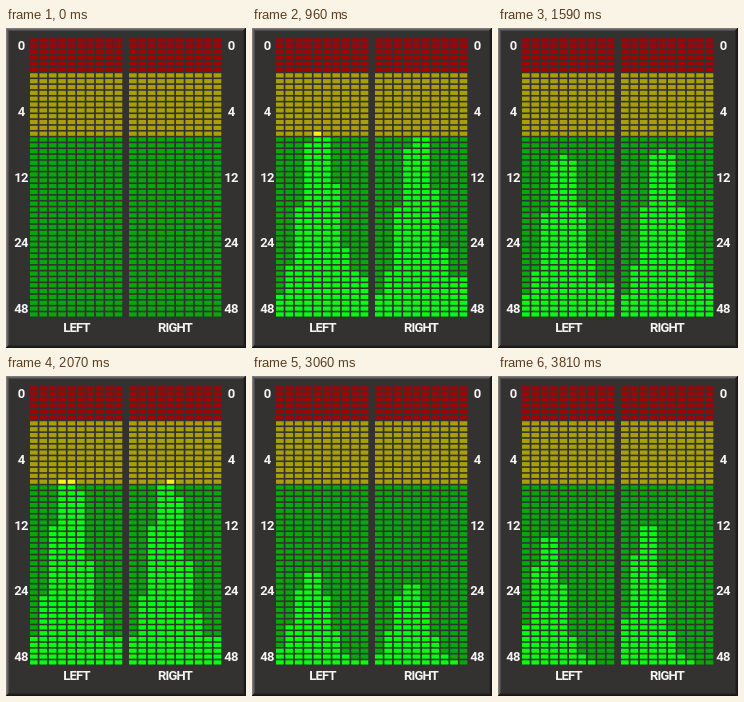
Write an HTML page with a canvas that moves like this. It is 240 by 320 pixels and loops after 3.84 s.

```html
<!DOCTYPE html>
<html lang="en">
<head>
<meta charset="utf-8">
<title>Stereo level meter</title>
<style>
  html, body { margin: 0; width: 100%; height: 100%; overflow: hidden; background: #333231; }
  canvas { display: block; width: 240px; height: 320px; }
</style>
</head>
<body>
<canvas id="meter" width="240" height="320"></canvas>
<script>
const ctx = document.getElementById('meter').getContext('2d');
const LOOP = 3840, STEP = 30;
const ROWS = 48, COLS = 10, TOP = 10.3, ROW_PITCH = 5.83, COL_PITCH = 9.4;
const CELL_WIDTH = 7.7, CELL_HEIGHT = 4.2;
const CHANNELS = [24, 123];

// The spectrum is a bell that grows, drifts and narrows between these moods.
const MOODS = [
  { time: 30, peaks: [0, 0], center: 4.2, width: 2.4, treble: 0 },
  { time: 450, peaks: [34, 34], center: 4.2, width: 2.4, treble: 7 },
  { time: 960, peaks: [32, 31], center: 4.1, width: 2.35, treble: 5 },
  { time: 1590, peaks: [28, 29], center: 4, width: 2.35, treble: 4 },
  { time: 2520, peaks: [36, 34], center: 3.5, width: 2.45, treble: 2 },
  { time: 3060, peaks: [16, 14], center: 3.4, width: 2.2, treble: 0 },
  { time: 3810, peaks: [22, 24], center: 2.35, width: 1.9, treble: 0 }
];

const ZONES = [
  { end: 6, dim: '#a00404', lit: '#ff1010' },
  { end: 17, dim: '#a8a006', lit: '#fff01c' },
  { end: ROWS, dim: '#06a80c', lit: '#06ff10' }
];

const mix = (a, b, p) => a + (b - a) * p;

function drawPanel() {
  ctx.fillStyle = '#333231';
  ctx.fillRect(0, 0, 240, 320);
  for (let i = 0; i < 3; i++) {
    const light = 124 - 24 * i, shade = 22 + 9 * i;
    ctx.fillStyle = `rgb(${shade}, ${shade}, ${shade})`;
    ctx.fillRect(239 - i, i, 1, 320 - 2 * i);
    ctx.fillRect(i, 319 - i, 240 - 2 * i, 1);
    ctx.fillStyle = `rgb(${light}, ${light}, ${light})`;
    ctx.fillRect(i, i, 239 - 2 * i, 1);
    ctx.fillRect(i, i, 1, 319 - 2 * i);
  }
}

function drawLabels() {
  ctx.font = 'bold 13px Roboto, sans-serif';
  ctx.letterSpacing = '-0.8px';
  ctx.textAlign = 'center';
  ctx.fillStyle = '#f4f4f4';
  ['0', '4', '12', '24', '48'].forEach((mark, i) => {
    const y = 22 + 65.8 * i;
    ctx.fillText(mark, 15, y);
    ctx.fillText(mark, 225, y);
  });
  ctx.fillText('LEFT', 70.5, 304);
  ctx.fillText('RIGHT', 169, 304);
}

function spectrumAt(time, side) {
  const next = Math.max(1, MOODS.findIndex(m => m.time >= time));
  const from = MOODS[next - 1], to = MOODS[next];
  const p = Math.max(0, (time - from.time) / (to.time - from.time));
  const attack = from.peaks[side] === 0;
  const eased = attack ? 1 - (1 - p) ** 3 : p;
  return {
    peak: mix(from.peaks[side], to.peaks[side], eased),
    center: mix(from.center, to.center, eased),
    width: mix(from.width, to.width, eased),
    treble: mix(from.treble, to.treble, eased)
  };
}

function level({ peak, center, width, treble }, col) {
  const bell = peak / (1 + (Math.abs(col - center) / width) ** 3.6);
  return Math.round(bell + treble * (col / (COLS - 1)) ** 4);
}

function drawChannel(time, side) {
  const spectrum = spectrumAt(time, side);
  for (let col = 0; col < COLS; col++) {
    const x = CHANNELS[side] + col * COL_PITCH;
    const firstLit = ROWS - level(spectrum, col);
    for (let row = 0; row < ROWS; row++) {
      const zone = ZONES.find(z => row < z.end);
      ctx.fillStyle = row >= firstLit ? zone.lit : zone.dim;
      ctx.fillRect(x, TOP + row * ROW_PITCH, CELL_WIDTH, CELL_HEIGHT);
    }
  }
}

const start = performance.now();

function render() {
  const elapsed = (performance.now() - start) % LOOP;
  const time = Math.floor(elapsed / STEP) * STEP;
  drawPanel();
  drawLabels();
  CHANNELS.forEach((_, side) => drawChannel(time, side));
  requestAnimationFrame(render);
}
render();
</script>
</body>
</html>
```
